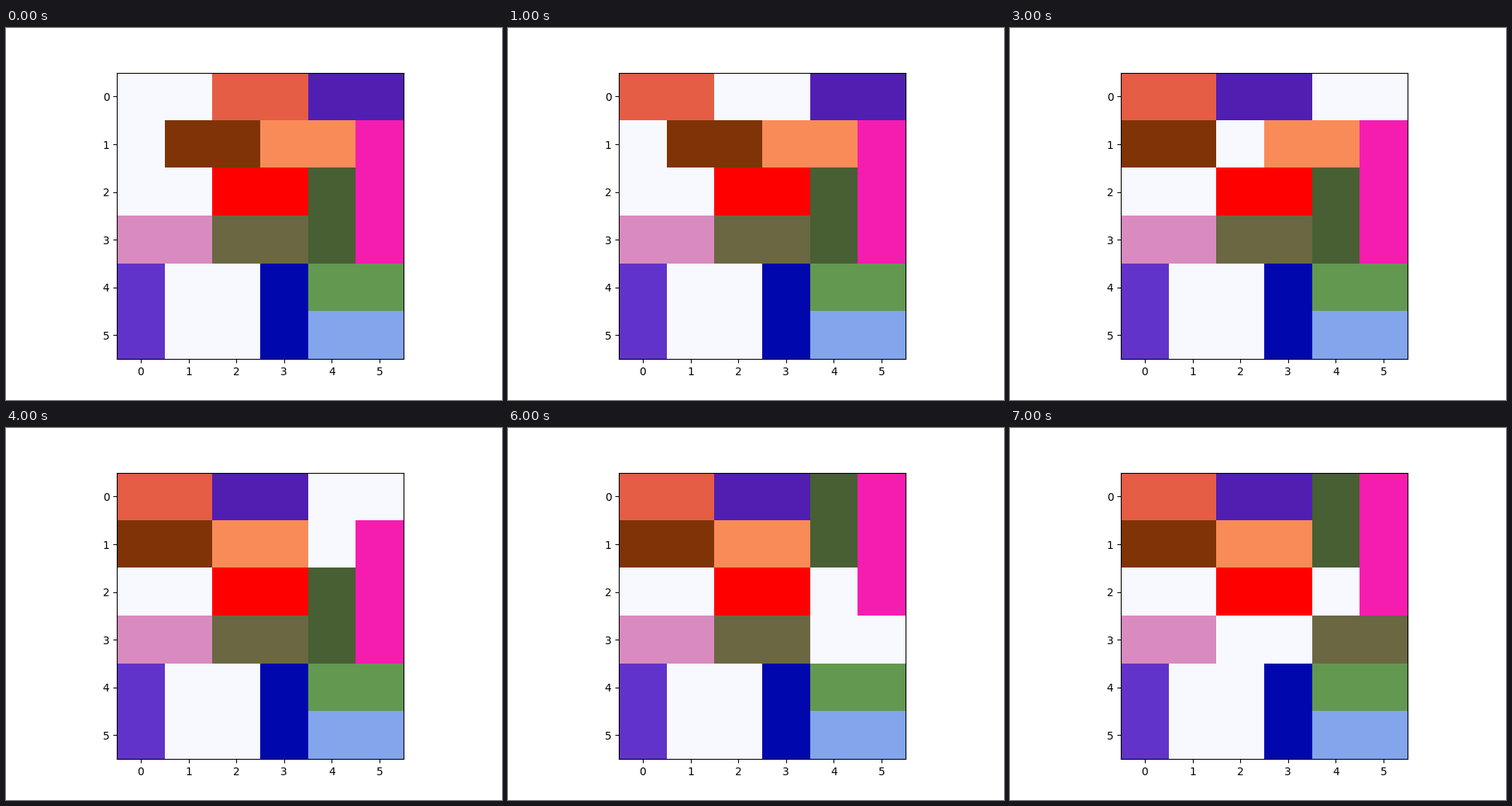
A matplotlib script that plays this animation: 640 by 480 pixels, repeating every 8 s.

```python
import numpy as np
import matplotlib.pyplot as plt
from matplotlib.animation import FuncAnimation
from matplotlib.colors import to_rgb

SIZE = 6
STEP_MS = 1000
EMPTY = "#f8f9ff"

# name: (row, column, length, direction, colour)
CARS = {
    "coral": (0, 2, 2, "h", "#e55d45"),
    "indigo": (0, 4, 2, "h", "#511eb2"),
    "brown": (1, 1, 2, "h", "#7f3306"),
    "orange": (1, 3, 2, "h", "#f98b58"),
    "pink": (1, 5, 3, "v", "#f51db0"),
    "red": (2, 2, 2, "h", "#ff0000"),
    "forest": (2, 4, 2, "v", "#475f32"),
    "lilac": (3, 0, 2, "h", "#d98abf"),
    "olive": (3, 2, 2, "h", "#6a6742"),
    "violet": (4, 0, 2, "v", "#6233ca"),
    "navy": (4, 3, 2, "v", "#0007ad"),
    "green": (4, 4, 2, "h", "#639850"),
    "sky": (5, 4, 2, "h", "#82a5ec"),
}

# One move per step: car and signed distance along its direction
MOVES = [
    ("coral", -2),
    ("indigo", -2),
    ("brown", -1),
    ("orange", -1),
    ("forest", -2),
    ("pink", -1),
    ("olive", 2),
]


def board(step):
    shift = dict.fromkeys(CARS, 0)
    for name, distance in MOVES[:step]:
        shift[name] += distance
    grid = np.empty((SIZE, SIZE, 3))
    grid[:] = to_rgb(EMPTY)
    for name, (row, col, length, direction, colour) in CARS.items():
        if direction == "h":
            col += shift[name]
            grid[row, col:col + length] = to_rgb(colour)
        else:
            row += shift[name]
            grid[row:row + length, col] = to_rgb(colour)
    return grid


fig, ax = plt.subplots(figsize=(6.4, 4.8), dpi=100)
image = ax.imshow(board(0))


def update(step):
    image.set_data(board(step))
    return [image]


anim = FuncAnimation(fig, update, frames=len(MOVES) + 1,
                     interval=STEP_MS, repeat=True, repeat_delay=0)
plt.show()
```
